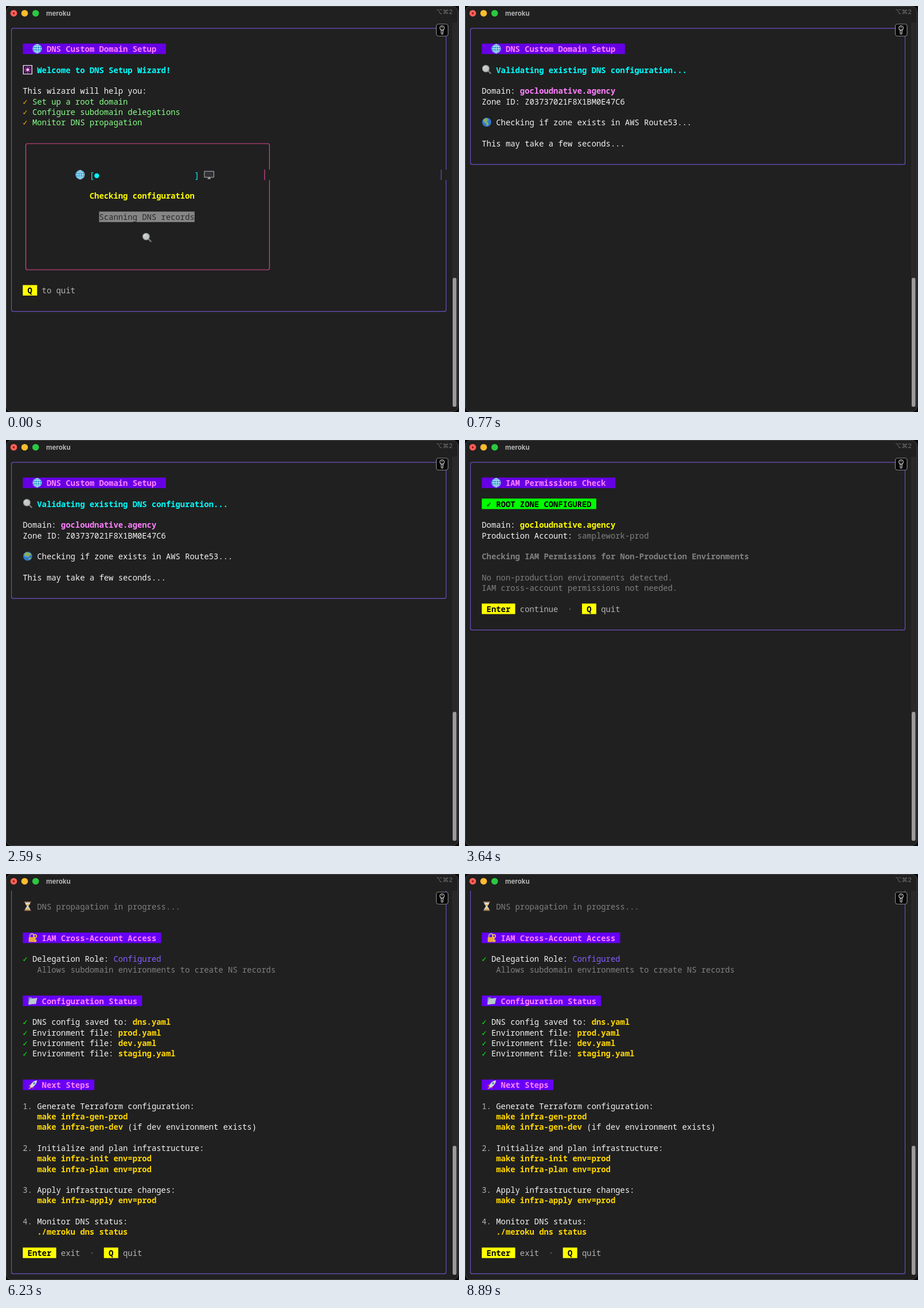
These frames come from a looping animation (790x708 px, 9.31 s). An HTML page with a canvas:

```html
<!DOCTYPE html>
<html lang="en">
<head>
<meta charset="utf-8">
<title>DNS setup wizard</title>
<style>
  html, body { margin: 0; width: 100%; height: 100%; overflow: hidden; background: #000; }
  canvas { display: block; }
</style>
</head>
<body>
<canvas id="stage" width="790" height="708"></canvas>
<script>
const ctx = document.getElementById('stage').getContext('2d');
const LOOP = 9310, STEP = 70;
const CELL = 8.32, ROW = 18.31, LEFT = 29.3, TOP = 47.2;
const MONO = '13.87px "Noto Sans Mono", "DejaVu Sans Mono", monospace';

const WHITE = '#f4f4f4', GRAY = '#808080', LIGHT = '#b4b4b4', DARK = '#202020';
const CYAN = '#00ffff', PINK = '#ff80ff', YELLOW = '#ffff00', GOLD = '#ffd700';
const GREEN = '#00ff00', VIOLET = '#6600e4', BORDER = '#6c50c4', ROSE = '#dc4696';

const colX = col => LEFT + col * CELL;
const rowY = row => TOP + row * ROW;

// Icons: lists of [path, fill, stroke, line width] in an 18 px box.
const disc = (x, y, r) => `M${x - r} ${y}a${r} ${r} 0 1 0 ${2 * r} 0a${r} ${r} 0 1 0 ${-2 * r} 0Z`;
const earth = land => [[disc(8.5, 9, 7.9), '#2f78cc'], [disc(7, 6.5, 4.5), '#4796e2'], [land, '#8fae52']];
const icons = {
  globe: [
    [disc(8.5, 9, 7.8), '#2f9bd0'],
    ['M1 9H16M2.5 5H14.5M2.5 13H14.5M8.5 1V17M8.5 1C3 5 3 13 8.5 17M8.5 1C14 5 14 13 8.5 17', null, '#d5f1fb', 0.9],
    [disc(8.5, 9, 7.6), null, '#a5daef', 0.8]
  ],
  lens: [
    ['M11 11L16 16', null, '#77777a', 2.6],
    [disc(7, 7, 5.7), '#c3c7c6', '#9b9d9e', 1.4],
    ['M3.5 7A3.5 3.5 0 0 1 7 3.5', null, '#e3e6e5', 1.3]
  ],
  sparkler: [
    ['M1 1.5H16V16.5H1Z', '#351342', '#e3dce8', 1.4],
    ['M8.5 3V15M3 9H14M4.5 5L12.5 13M12.5 5L4.5 13', null, '#c34cc1', 1.3],
    [disc(8.5, 9, 2.2), '#ffd4ed']
  ],
  monitor: [
    ['M0.5 3H17V13.5H0.5Z', '#303235', '#b7babd', 1],
    ['M7 14H10.5L11.5 16.5H6Z', '#a9adb0']
  ],
  earth0: earth('M6 3L11 2.5L14 6L12 8L14 10L11 15L9 15L8 10L4.5 9L4 6Z'),
  earth1: earth('M2.5 5L7 2L11 3.5L9 6L7.5 8L10 9.5L12 11L9.5 16L8 14L7.5 11L4 8Z'),
  earth2: earth('M2 6L6 2L13 3.5L14.5 7L11 8L9.5 11L7 8L4 9ZM10 12L14 11.5L14 14L10.5 14.5Z'),
  hourglass: [
    ['M4 2.5H13C13 6 10 7.5 10 9S13 12 13 15.5H4C4 12 7 10.5 7 9S4 6 4 2.5Z', '#d9dedb'],
    ['M5 5.5H12L8.5 9ZM8.5 11L12 15H5Z', '#e3b04d'],
    ['M2.8 1.8H14.2M2.8 16.2H14.2', null, '#a77b52', 1.8]
  ],
  lock: [
    ['M4 9V5.5C4 1 11 1 11 5.5V9', null, '#b4b4aa', 1.8],
    ['M2 8H13V16.5H2Z', '#e8aa37'],
    [disc(13, 6, 2.6), null, '#f4c848', 1.7],
    ['M13 9V16M13 13.5H16M13 15.8H15.5', null, '#f4c848', 1.6]
  ],
  folder: [
    ['M2 3H7L8.5 5H15V15H1Z', '#7c929c'],
    ['M4 6L17 4L14.5 14L1.5 16Z', '#b9c8ce']
  ],
  rocket: [
    ['M5 8L1 11L6 12ZM9 13L8 17L12 12Z', '#d94b4b'],
    ['M4 13L1.5 16.5L6.5 15Z', '#f3a43a'],
    ['M16.5 1.5C11 2 7 5 4 12L6.5 14.5C13 11 16 7 16.5 1.5Z', '#d4d9dd'],
    [disc(11.5, 6.5, 1.7), '#3d7dab']
  ]
};

function icon(row, col, name) {
  ctx.save();
  ctx.translate(colX(col), rowY(row));
  for (const [d, fill, stroke, width] of icons[name]) {
    const path = new Path2D(d);
    if (fill) { ctx.fillStyle = fill; ctx.fill(path); }
    if (stroke) { ctx.strokeStyle = stroke; ctx.lineWidth = width; ctx.stroke(path); }
  }
  ctx.restore();
}

// One glyph per terminal cell.
function put(row, col, text, color = WHITE, bold = false) {
  ctx.font = (bold ? 'bold ' : '') + MONO;
  ctx.textAlign = 'center';
  ctx.fillStyle = color;
  [...text].forEach((glyph, i) => {
    if (glyph !== ' ') ctx.fillText(glyph, colX(col + i + 0.5), rowY(row) + 14.6);
  });
}

function badge(row, col, text, color, background, bold = true) {
  ctx.fillStyle = background;
  ctx.fillRect(colX(col), rowY(row), text.length * CELL, ROW);
  put(row, col, text, color, bold);
}

function key(row, col, name, label) {
  badge(row, col, ` ${name} `, '#000', YELLOW);
  put(row, col + name.length + 3, label, LIGHT);
}

function roundRect(x, y, w, h, r, fill, stroke, width = 1.2) {
  ctx.beginPath();
  ctx.roundRect(x, y, w, h, r);
  if (fill) { ctx.fillStyle = fill; ctx.fill(); }
  if (stroke) { ctx.strokeStyle = stroke; ctx.lineWidth = width; ctx.stroke(); }
}

function circle(x, y, r, color) {
  ctx.beginPath();
  ctx.arc(x, y, r, 0, 7);
  ctx.fillStyle = color;
  ctx.fill();
}

const panel = bottomRow => roundRect(9.5, 38.8, 758, rowY(bottomRow + 0.5) - 38.5, 3, null, BORDER);

// Moves one row of a right-hand border from x to shiftedX.
function shiftBorder(x, shiftedX, row, color) {
  ctx.fillStyle = DARK;
  ctx.fillRect(x - 2, rowY(row), 4, ROW);
  ctx.fillStyle = color;
  ctx.fillRect(shiftedX - 0.6, rowY(row), 1.2, ROW);
}

function pageTitle(text) {
  badge(1, 0, `     ${text}  `, PINK, VIOLET);
  icon(1, 2, 'globe');
}

function section(row, iconName, text) {
  badge(row, 0, `    ${text} `, PINK, '#6600f6');
  icon(row, 1, iconName);
}

function welcome(t) {
  panel(26);
  shiftBorder(767.5, 759, 13, BORDER);
  pageTitle('DNS Custom Domain Setup');
  icon(3, 0, 'sparkler');
  put(3, 3, 'Welcome to DNS Setup Wizard!', CYAN, true);
  put(5, 0, 'This wizard will help you:');
  ['Set up a root domain', 'Configure subdomain delegations', 'Monitor DNS propagation'].forEach((item, i) => {
    put(6 + i, 0, '✓', '#ffaf00');
    put(6 + i, 2, item, '#87ff87');
  });

  roundRect(34.5, 240, 425, 220, 3, null, ROSE);
  shiftBorder(459.5, 451, 13, ROSE);
  icon(13, 11, 'globe');
  put(13, 14, '[', CYAN);
  circle(colX(15.5 + Math.floor(t / 100) % 21), rowY(13) + 10.8, 4.2, CYAN);
  put(13, 36, ']', CYAN);
  icon(13, 38, 'monitor');
  put(15, 14, 'Checking configuration', YELLOW, true);
  badge(17, 16, 'Scanning DNS records', '#2a2a2a', '#868686', false);
  icon(19, 25, 'lens');
  key(24, 0, 'Q', 'to quit');
}

function validating(t) {
  const spin = Math.floor((t - 765) / 258) + 1;
  panel(12);
  pageTitle('DNS Custom Domain Setup');
  icon(3, 0, 'lens');
  put(3, 3, 'Validating existing DNS configuration...', CYAN, true);
  put(5, 0, 'Domain:');
  put(5, 8, 'gocloudnative.agency', PINK, true);
  put(6, 0, 'Zone ID: Z03737021F8X1BM0E47C6');
  icon(8, 0, 'earth' + spin % 3);
  put(8, 3, 'Checking if zone exists in AWS Route53...');
  put(10, 0, 'This may take a few seconds...');
}

function permissions() {
  panel(15);
  pageTitle('IAM Permissions Check');
  badge(3, 0, ' ✓ ROOT ZONE CONFIGURED ', '#000', GREEN);
  put(5, 0, 'Domain:');
  put(5, 8, 'gocloudnative.agency', YELLOW, true);
  put(6, 0, 'Production Account:');
  put(6, 20, 'samplework-prod', GRAY);
  put(8, 0, 'Checking IAM Permissions for Non-Production Environments', GRAY, true);
  put(10, 0, 'No non-production environments detected.', GRAY);
  put(11, 0, 'IAM cross-account permissions not needed.', GRAY);
  key(13, 0, 'Enter', 'continue');
  put(13, 18, '·', GRAY);
  key(13, 21, 'Q', 'quit');
}

const files = [
  ['DNS config saved to: ', 'dns.yaml'],
  ['Environment file: ', 'prod.yaml'],
  ['Environment file: ', 'dev.yaml'],
  ['Environment file: ', 'staging.yaml']
];
const steps = [
  ['Generate Terraform configuration:', 'make infra-gen-prod', 'make infra-gen-dev'],
  ['Initialize and plan infrastructure:', 'make infra-init env=prod', 'make infra-plan env=prod'],
  ['Apply infrastructure changes:', 'make infra-apply env=prod'],
  ['Monitor DNS status:', './meroku dns status']
];

function summary() {
  // Scrolled down: the panel's top edge is out of view.
  ctx.save();
  ctx.beginPath();
  ctx.rect(0, 29, 790, 679);
  ctx.clip();
  roundRect(9.5, 0, 758, rowY(35.5), 3, null, BORDER);
  ctx.restore();

  icon(0, 0, 'hourglass');
  put(0, 3, 'DNS propagation in progress...', GRAY);
  section(3, 'lock', 'IAM Cross-Account Access');
  put(5, 0, '✓', GREEN);
  put(5, 2, 'Delegation Role:');
  put(5, 19, 'Configured', '#875fff');
  put(6, 3, 'Allows subdomain environments to create NS records', GRAY);

  section(9, 'folder', 'Configuration Status');
  files.forEach(([label, file], i) => {
    put(11 + i, 0, '✓', GREEN);
    put(11 + i, 2, label);
    put(11 + i, 2 + label.length, file, GOLD, true);
  });

  section(17, 'rocket', 'Next Steps');
  let row = 19;
  steps.forEach(([label, ...commands], i) => {
    put(row, 0, `${i + 1}.`, LIGHT);
    put(row++, 3, label);
    for (const command of commands) put(row++, 3, command, GOLD, true);
    row++;
  });
  put(21, 22, '(if dev environment exists)');

  key(33, 0, 'Enter', 'exit');
  put(33, 14, '·', GRAY);
  key(33, 17, 'Q', 'quit');
}

function terminalWindow() {
  ctx.fillStyle = '#0a0a0a';
  ctx.fillRect(0, 0, 790, 708);
  roundRect(0.5, 0.5, 788, 707, 10, DARK, '#484848', 1);
  ctx.fillStyle = '#292929';
  ctx.fillRect(778, 29, 9, 670);
  roundRect(779, 474, 6.5, 225, 3, '#9b9b9b');

  circle(13.5, 12.7, 5.8, '#ff5f57');
  circle(13.5, 12.7, 1.7, '#8c1a13');
  circle(32.5, 12.7, 5.8, '#febc2e');
  circle(51.7, 12.7, 5.8, '#2bc840');
  ctx.font = 'bold 11.5px Inter, sans-serif';
  ctx.textAlign = 'left';
  ctx.fillStyle = '#b3b3b3';
  ctx.fillText('meroku', 70, 17);
  ctx.font = '11px Inter, "DejaVu Sans", sans-serif';
  ctx.textAlign = 'right';
  ctx.fillStyle = '#707070';
  ctx.fillText('⌥⌘2', 779, 14);
}

function keyButton() {
  roundRect(750.5, 31.5, 20.5, 21, 4, '#050505', '#858585', 1.2);
  ctx.strokeStyle = '#d8d8d8';
  ctx.lineWidth = 1.1;
  ctx.stroke(new Path2D(disc(760.5, 38.3, 3.8) + 'M759 42V47.5L760.5 49.5L762.3 47.5L761.2 46L762.3 44.5V42'));
  circle(760.5, 37, 0.9, '#d8d8d8');
}

function draw(t) {
  terminalWindow();
  if (t < 560) welcome(t);
  else if (t < 3640) validating(t);
  else if (t < 6230) permissions();
  else summary();
  keyButton();
}

const start = performance.now();
function tick() {
  const t = (performance.now() - start) % LOOP;
  draw(Math.floor(t / STEP) * STEP);
  requestAnimationFrame(tick);
}
tick();
</script>
</body>
</html>
```
